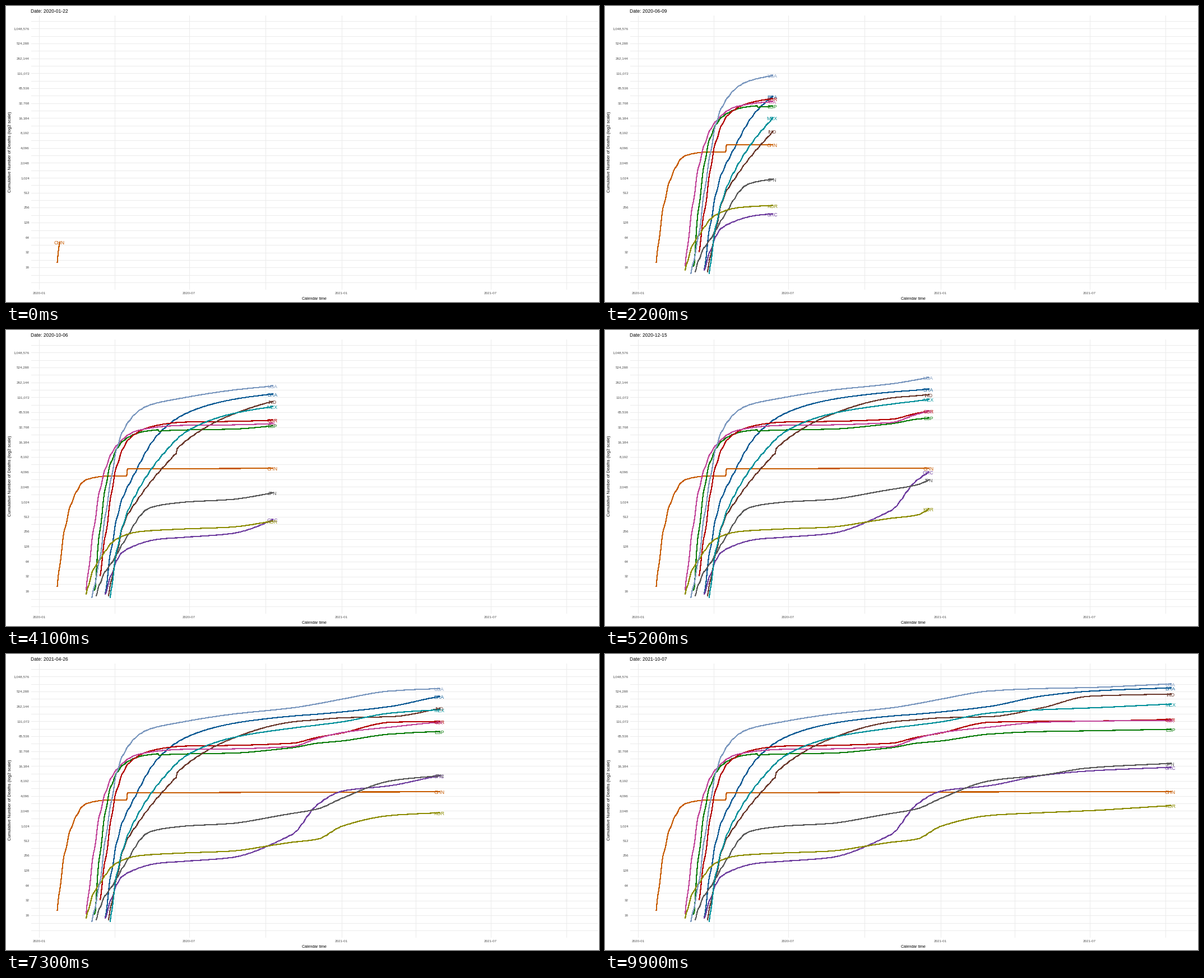
A matplotlib script that plays this animation: 1058x529 px, repeating every 10000 ms.

```python
import numpy as np
import matplotlib.pyplot as plt
from matplotlib.animation import FuncAnimation

W, H, DPI = 1058, 529, 64
FRAMES, INTERVAL = 100, 100
PT = 72 / DPI                      # points per pixel

X0, DAY = 58.6, 1.4735             # pixel of 2020-01-01, pixels per day
Y20, OCTAVE = 39.2, 26.69          # pixel of 2^20, pixels per doubling
FIRST, LAST, SPAN = 21, 645, 624   # day numbers counted from 2020-01-01

# every curve is pinned at the same ages after its start, then at the same dates
AGES = np.array([0, 13, 28, 52, 95])
DATES = np.array([320, 400, 510, 555, 600, 687, 780, 864, 1010])

plt.rcParams["font.family"] = "Liberation Sans"

fig = plt.figure(figsize=(W / DPI, H / DPI), dpi=DPI, facecolor="white")
ax = fig.add_axes([0, 0, 1, 1])
ax.set_xlim(-0.5, W - 0.5)         # whole numbers are pixel centres
ax.set_ylim(H - 0.5, -0.5)
ax.axis("off")


def label(x, y, s, size, color="black", ha="center", **kw):
    """Text whose capitals are centred on y."""
    return ax.text(x, y + 0.36 * size, s, fontsize=size * PT, color=color,
                   ha=ha, va="baseline", **kw)


def rule(xs, ys):
    ax.plot(xs, ys, color="#EBEBEB", lw=PT, antialiased=False, zorder=1)


def smooth(x, xs, ys):
    """Monotone cubic curve through the points."""
    h = np.diff(xs)
    d = np.diff(ys) / h
    a, b = d[:-1], d[1:]
    same = a * b > 0
    inner = np.where(same, 2 * a * b / np.where(same, a + b, 1), 0)
    m = np.concatenate([d[:1], inner, d[-1:]])
    i = np.clip(np.searchsorted(xs, x, "right") - 1, 0, len(h) - 1)
    t = (x - xs[i]) / h[i]
    return (ys[i] * (1 + 2 * t) * (1 - t) ** 2 + ys[i + 1] * t * t * (3 - 2 * t)
            + h[i] * (m[i] * t * (1 - t) ** 2 - m[i + 1] * t * t * (1 - t)))


class Country:
    def __init__(self, code, color, start, levels, jump=(W, 0)):
        """levels: heights at AGES and DATES; jump: place and size of a correction."""
        at, step = jump
        knots = np.concatenate([start + AGES, DATES])
        heights = np.array(levels) - step * (knots > at)
        self.days = np.arange(round((start - X0) / DAY), LAST + 1)
        self.x = X0 + DAY * self.days

        # weekly reporting rhythm; log time eases the steep first wave
        rhythm = self.x + 0.45 * DAY * np.sin(2 * np.pi * self.days / 7)
        age = np.clip(rhythm - start, 0, DATES[-1] - start)
        y = smooth(np.log(age + 20), np.log(knots - start + 20), heights)
        y += step * (self.x > at)

        # deaths are whole numbers, which makes the low part of a curve stepped
        count = np.round(2 ** (20 - (y - Y20) / OCTAVE))
        self.y = Y20 + OCTAVE * (20 - np.log2(count))
        self.line, = ax.plot([], [], color=color, lw=1.1 * PT, zorder=3,
                             antialiased=False, solid_joinstyle="round")
        self.tag = label(0, 0, code, 8.7, color, zorder=4)

    def show(self, day):
        n = int(np.sum(self.days <= day))
        self.line.set_data(self.x[:n], self.y[:n])
        self.tag.set_visible(n > 0)
        if n:
            self.tag.set_position((self.x[n - 1] - 1, self.y[n - 1] + 1 + 0.36 * 8.7))


# grid and axes
for gx in (58, 193, 326, 462, 598, 730, 864, 999):
    rule([gx, gx], [16, 505])
for k in range(-1, 35):
    gy = round(Y20 + k * OCTAVE / 2)
    rule([44, 1054], [gy, gy])
for p in range(4, 21):
    label(41.3, Y20 + (20 - p) * OCTAVE, f"{2 ** p:,}", 6.2, "#4D4D4D", "right")
for tx, s in ((58.5, "2020-01"), (326, "2020-07"), (597.7, "2021-01"), (864, "2021-07")):
    label(tx, 512.5, s, 6.2, "#4D4D4D")
label(549.2, 521.5, "Calendar time", 7)
ax.text(7.2, 260, "Cumulative Number of Deaths (log2 scale)", fontsize=7.6 * PT,
        rotation=90, ha="center", va="center")
title = label(43.7, 8.2, "", 8.5, ha="left")

countries = [
    Country("BRA", "#0B5A94", 176, [479, 381, 310, 258, 186, 149, 124.5, 110.5,
                                    107, 103, 93, 74.5, 66, 60]),
    Country("CHN", "#C75B00", 91, [463, 358, 302, 267, 260.4, 247.2, 247, 246.7,
                                   246.5, 246.1, 246, 245.6, 245.4, 245.3],
            jump=(215.5, -12.7)),
    Country("ESP", "#0A7D0A", 158, [463, 324, 239, 196.5, 179.7, 178, 176.8, 167,
                                    159, 154.8, 142.5, 138, 136.8, 134],
            jump=(271, 2.5)),
    Country("GBR", "#B30000", 167, [442, 346, 251, 194.5, 171.5, 164, 162.9, 159,
                                    148.5, 140.5, 121.5, 119.9, 119.4, 116.5]),
    Country("GRC", "#7040A0", 176, [474, 433, 400, 385.5, 373.5, 369.8, 363.5, 322,
                                    269, 244.5, 234.5, 216.5, 208.5, 202]),
    Country("IND", "#6B3A2E", 183, [475, 405, 342, 302, 247, 198, 152, 121,
                                    117, 113.5, 111.5, 95.5, 75, 71],
            jump=(304, -7)),
    Country("ITA", "#C2479B", 142, [476, 363, 272, 210, 178.5, 169.8, 169.1, 165,
                                    150.5, 139.8, 130, 121.5, 119.5, 118]),
    Country("JPN", "#595959", 161, [473, 436, 414, 373, 317.5, 307, 302.5, 284.5,
                                    276.5, 257, 226, 216, 203, 195]),
    Country("KOR", "#8C8C00", 142, [476, 429, 405, 375, 360, 355, 351.8, 336,
                                    330.5, 307, 288, 283, 279.5, 270.5]),
    Country("MEX", "#00909A", 186, [476, 385, 331, 281, 220, 182, 150, 132,
                                    126.5, 120.7, 105, 99, 96, 89]),
    Country("USA", "#7B98BF", 153, [480, 413, 303, 187, 137, 120, 107.5, 95.8,
                                    88.5, 80, 65.5, 61.2, 59.5, 53]),
]


def update(frame):
    elapsed = frame * SPAN / (FRAMES - 1)
    title.set_text(f"Date: {np.datetime64('2020-01-22') + round(elapsed)}")
    # the curves run a few days ahead of the date in the title
    day = min(FIRST + int(elapsed) + 4, LAST)
    for c in countries:
        c.show(day)
    return []


anim = FuncAnimation(fig, update, frames=FRAMES, interval=INTERVAL, repeat=True)
plt.show()
```
